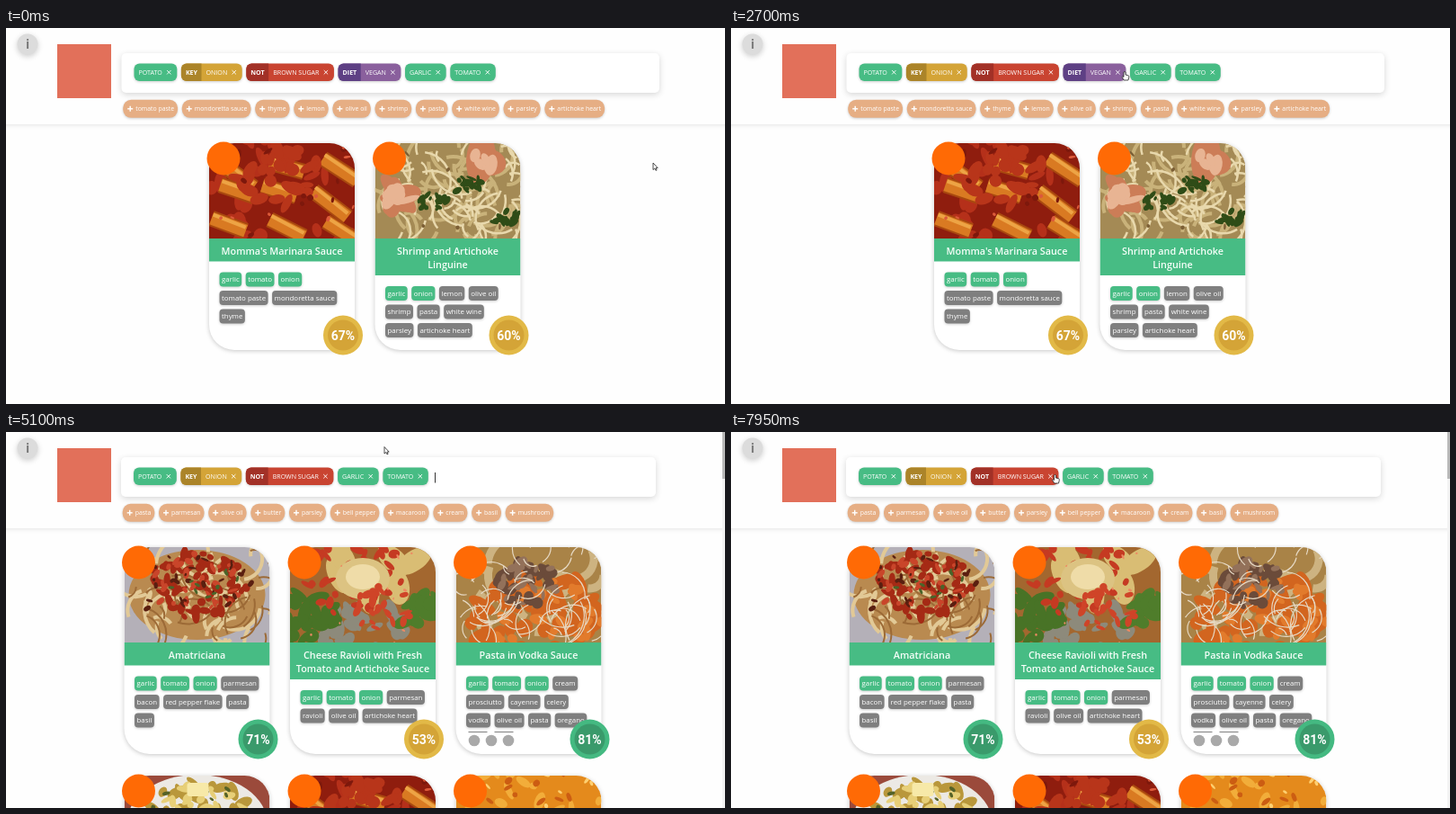
An HTML page with a canvas for the animation above (8000 ms loop, 800 by 418 pixels).

```html
<!DOCTYPE html>
<html lang="en">
<head>
<meta charset="utf-8">
<title>Recipe search</title>
<style>
html, body { margin: 0; width: 100%; height: 100%; overflow: hidden; background: #fefefe; }
canvas { display: block; }
</style>
</head>
<body>
<canvas id="stage" width="800" height="418"></canvas>
<script>
const LOOP = 8000, CLICK = 4000, LOADED = 4700, BLINK = 530;
const GREEN = '#47bc84', GRAY = '#7f7f7f', GOLD = '#d4a437', PAGE = '#fefefe';
const SANS = '"Open Sans", "Noto Sans", sans-serif', ROBOTO = 'Roboto, sans-serif';
const CARD_W = 162, CARD_H = 230, PHOTO_H = 106, COLUMN = 184.5, ROW = 254;
const stage = document.getElementById('stage').getContext('2d');
let g = stage;

// ---------- drawing helpers ----------
function shadow(blur = 0, dy = 0, alpha = 0) {
  g.shadowColor = `rgba(0,0,0,${alpha})`;
  g.shadowBlur = blur;
  g.shadowOffsetY = dy;
}
function box(x, y, w, h, r, color) {
  g.fillStyle = color;
  g.beginPath();
  g.roundRect(x, y, w, h, r);
  g.fill();
}
function raisedBox(...args) {
  shadow(3, 1, 0.2);
  box(...args);
  shadow();
}
function ellipse(color, x, y, rx, ry = rx, turn = 0) {
  g.fillStyle = color;
  g.beginPath();
  g.ellipse(x, y, rx, ry, turn, 0, 7);
  g.fill();
}
function text(str, x, y, font, color = '#fff', align = 'left') {
  g.font = font;
  g.fillStyle = color;
  g.textAlign = align;
  g.fillText(str, x, y);
}
function textWidth(str, font) {
  g.font = font;
  return g.measureText(str).width;
}
function line(color, width, x0, y0, x1, y1) {
  g.strokeStyle = color;
  g.lineWidth = width;
  g.beginPath();
  g.moveTo(x0, y0);
  g.lineTo(x1, y1);
  g.stroke();
}
function clipped(x, y, w, h, r, draw) {
  g.save();
  g.beginPath();
  g.roundRect(x, y, w, h, r);
  g.clip();
  g.translate(x, y);
  draw();
  g.restore();
}

// ---------- food pictures; places are fractions of the photo ----------
let seed = 1;
const random = () => (seed = (seed * 16807) % 2147483647) / 2147483647;

function fill(color) {
  box(0, 0, CARD_W, PHOTO_H, 0, color);
}
function bits(color, count, size, cx = 0.5, cy = 0.5, spread = 0.75) {
  while (count--) {
    const angle = random() * 6.3, away = Math.sqrt(random()) * spread;
    ellipse(color, (cx + Math.cos(angle) * away) * CARD_W, (cy + Math.sin(angle) * away) * PHOTO_H,
      size * (0.6 + random()), size * (0.4 + random() * 0.5), random() * 3);
  }
}
function strands(color, width, count) {
  g.strokeStyle = color;
  g.lineWidth = width;
  while (count--) {
    const start = random() * 6.3;
    g.beginPath();
    g.arc(random() * CARD_W, random() * PHOTO_H, 10 + random() * 25, start, start + 1 + random());
    g.stroke();
  }
}
function penne(count) {
  for (let i = 0; i < count; i++) {
    const x = (i % 3) * 58 + random() * 14, y = Math.floor(i / 3) * 36 + 10 + random() * 12;
    const dy = 10 + random() * 20;
    line('#a8480f', 18, x, y, x + 38, y + dy);
    line('#d97a22', 14, x, y, x + 38, y + dy);
    line('#eda445', 4, x + 2, y - 4, x + 38, y + dy - 4);
  }
}
const pictures = {
  marinara() {
    fill('#8f1d0e');
    bits('#b5301a', 40, 9);
    penne(9);
    bits('#b8351a', 30, 8, 0.5, 0.35, 0.3);
    bits('#7d180c', 22, 4);
    bits('#dc5a3a', 14, 2.5);
  },
  shrimp() {
    fill('#a48a55');
    strands('#c9b27a', 4, 60);
    strands('#e8d8ac', 2.5, 60);
    bits('#7c5f35', 20, 3);
    for (const [x, y] of [[0.16, 0.58], [0.74, 0.18]]) {
      bits('#cc7d57', 6, 19, x, y, 0.06);
      bits('#e8b493', 6, 9, x, y, 0.09);
    }
    for (const [x, y] of [[0.4, 0.62], [0.65, 0.45], [0.9, 0.8]]) bits('#2f4c17', 16, 4, x, y, 0.1);
  },
  amatriciana() {
    fill('#b4b0b8');
    ellipse('#b98a50', CARD_W / 2, PHOTO_H / 2, 76, 50);
    strands('#e2c996', 4, 50);
    strands('#9c6a36', 2, 35);
    bits('#a52a15', 60, 6, 0.5, 0.4, 0.34);
    bits('#c9452a', 30, 4, 0.5, 0.4, 0.34);
    bits('#5a1f10', 28, 3, 0.5, 0.45, 0.4);
    bits('#49652a', 10, 2.5, 0.5, 0.4, 0.3);
  },
  ravioli() {
    fill('#a3672f');
    bits('#8d8a7b', 34, 9, 0.5, 0.9, 0.3);
    bits('#487326', 30, 9, 0.08, 0.75, 0.25);
    bits('#4f7d2b', 24, 9, 0.95, 0.7, 0.2);
    bits('#d9bd74', 12, 16, 0.55, 0.1, 0.4);
    bits('#c53a22', 40, 6, 0.4, 0.3, 0.4);
    ellipse('#dcc382', CARD_W / 2, 35, 30, 23);
    ellipse('#efdca8', CARD_W / 2, 33, 19, 14);
    bits('#cf4428', 22, 5, 0.62, 0.65, 0.24);
    bits('#ee8a63', 16, 2);
  },
  vodka() {
    fill('#a98347');
    strands('#cdb381', 9, 20);
    bits('#d2651f', 60, 11, 0.55, 0.75, 0.45);
    bits('#e27b2c', 26, 7, 0.55, 0.75, 0.45);
    bits('#6b4b3a', 30, 7, 0.48, 0.4, 0.22);
    bits('#93715a', 22, 5, 0.48, 0.38, 0.25);
    strands('#e6d9c4', 1.2, 70);
  },
  gnocchi() {
    fill('#9b4a3b');
    ellipse('#ece9e4', CARD_W / 2, PHOTO_H / 2, 78, 54);
    bits('#b9973b', 60, 7, 0.5, 0.45, 0.38);
    bits('#e7cf78', 40, 5, 0.5, 0.45, 0.36);
    bits('#556227', 12, 3, 0.5, 0.4, 0.35);
    box(70, 8, 24, 15, 3, '#f7e9a8');
  },
  baked() {
    fill('#e48a1c');
    bits('#f2ad3a', 60, 7);
    bits('#cc5d12', 36, 4);
    bits('#ffd071', 30, 3);
  }
};

// ---------- interface parts ----------
function searchChips(x, chips) {
  const top = 39.5, h = 19.5, font = `500 7.1px ${SANS}`, bold = `700 7.1px ${SANS}`;
  for (const [label, color, key, keyColor] of chips) {
    const keyW = key ? textWidth(key, bold) + 9.5 : 0;
    const w = keyW + textWidth(label, font) + 21.5;
    raisedBox(x, top, w, h, 6, color);
    if (key) {
      box(x, top, keyW, h, [6, 0, 0, 6], keyColor);
      text(key, x + 5, 52, bold);
    }
    text(label, x + keyW + 5, 52, font);
    const cx = x + w - 9, cy = top + h / 2;
    for (const d of [-2.2, 2.2]) line('#fff', 0.9, cx - 2.2, cy - d, cx + 2.2, cy + d);
    x += w + 4.6;
  }
}
function suggestions(x, y, labels) {
  const font = `500 6.9px ${SANS}`;
  for (const label of labels.split(',')) {
    const w = textWidth(label, font) + 18;
    raisedBox(x, y, w, 20, 9, '#e6ae84');
    line('#fff', 1.4, x + 5, y + 10, x + 11, y + 10);
    line('#fff', 1.4, x + 8, y + 7, x + 8, y + 13);
    text(label, x + 14, y + 12.4, font);
    x += w + 4.7;
  }
}
function ingredients(y, rows, owned) {
  const font = `500 7.9px ${SANS}`;
  rows.forEach((row, r) => {
    let x = 11.5;
    const top = y + r * 20.5;
    row.split(',').forEach((label, i) => {
      const w = textWidth(label, font) + 5;
      raisedBox(x, top, w, 16, 4, r === 0 && i < owned ? GREEN : GRAY);
      text(label, x + 2.5, top + 10.8, font);
      x += w + 4.5;
    });
  });
}
function badge(x, y, percent) {
  const good = percent > 70;
  ellipse(good ? '#44b981' : '#e2b947', x, y, 22);
  ellipse(good ? '#3a9a6b' : GOLD, x, y, 17);
  text(percent + '%', x, y + 5, `700 14px ${ROBOTO}`, '#fff', 'center');
}
function card(x, y, { picture, title = [], rows = [], owned, percent, more }) {
  const extra = title.length > 1 ? 15.5 : 0;
  shadow(5, 1, 0.22);
  box(x, y, CARD_W, CARD_H, 28, '#fff');
  shadow();
  clipped(x, y, CARD_W, CARD_H, 28, () => {
    seed = 7;
    clipped(0, 0, CARD_W, PHOTO_H, 0, pictures[picture]);
    box(0, PHOTO_H, CARD_W, 25.5 + extra, 0, GREEN);
    title.forEach((part, i) =>
      text(part, CARD_W / 2, 123.5 + i * 15.5, `600 10.8px ${SANS}`, '#f6fff9', 'center'));
    ingredients(143.5 + extra, rows, owned);
    for (let i = 0; more && i < 3; i++) {
      if (i < 2) box(14 + i * 29, 205, 21, 1, 0, GRAY);
      ellipse('#a9a9a9', 20.5 + i * 19, 215, 6.3);
    }
  });
  ellipse('#ff6a05', x + 16, y + 17, 18.5);
  if (percent) badge(x + 149, y + 213.5, percent);
}
function cards(left, list) {
  list.forEach((item, i) => card(left + (i % 3) * COLUMN, 128 + Math.floor(i / 3) * ROW, item));
}
function header(left, right, vegan, suggested) {
  box(0, 0, 800, 418, 0, PAGE);
  shadow(5, 1, 0.1);
  box(-9, -9, 818, 116, 0, PAGE);
  shadow(6, 2, 0.2);
  ellipse('#dcdcdc', 24, 18, 11.5);
  shadow();
  text('i', 24, 23, `700 14px ${ROBOTO}`, '#777', 'center');
  box(57, 18, 60, 60, 0, '#e2705a');
  shadow(7, 2, 0.16);
  box(left, 28, right - left, 44, 5, '#fff');
  shadow();
  searchChips(left + 14, [
    ['POTATO', GREEN],
    ['ONION', GOLD, 'KEY', '#ab8429'],
    ['BROWN SUGAR', '#c94431', 'NOT', '#a23127'],
    ...(vegan ? [['VEGAN', '#8a609d', 'DIET', '#5e4084']] : []),
    ['GARLIC', GREEN],
    ['TOMATO', GREEN]
  ]);
  suggestions(left + 1.7, 79.8, suggested);
}

// ---------- the three screens ----------
const firstSuggestions = 'tomato paste,mondoretta sauce,thyme,lemon,olive oil,shrimp,pasta,white wine,parsley,artichoke heart';
const newSuggestions = 'pasta,parmesan,olive oil,butter,parsley,bell pepper,macaroon,cream,basil,mushroom';

function firstResults() {
  header(128.5, 727, true, firstSuggestions);
  cards(226, [
    { picture: 'marinara', title: ["Momma's Marinara Sauce"], owned: 3, percent: 67,
      rows: ['garlic,tomato,onion', 'tomato paste,mondoretta sauce', 'thyme'] },
    { picture: 'shrimp', title: ['Shrimp and Artichoke', 'Linguine'], owned: 2, percent: 60,
      rows: ['garlic,onion,lemon,olive oil', 'shrimp,pasta,white wine', 'parsley,artichoke heart'] }
  ]);
}
function loading() {
  header(128.5, 727, false, firstSuggestions);
  text('Loading Deliciousness...', 399.5, 359.5, `700 14px ${ROBOTO}`, '#000', 'center');
}
function newResults() {
  header(128, 723, false, newSuggestions);
  cards(131.5, [
    { picture: 'amatriciana', title: ['Amatriciana'], owned: 3, percent: 71,
      rows: ['garlic,tomato,onion,parmesan', 'bacon,red pepper flake,pasta', 'basil'] },
    { picture: 'ravioli', title: ['Cheese Ravioli with Fresh', 'Tomato and Artichoke Sauce'], owned: 3, percent: 53,
      rows: ['garlic,tomato,onion,parmesan', 'ravioli,olive oil,artichoke heart'] },
    { picture: 'vodka', title: ['Pasta in Vodka Sauce'], owned: 3, percent: 81, more: true,
      rows: ['garlic,tomato,onion,cream', 'prosciutto,cayenne,celery', 'vodka,olive oil,pasta,oregano'] },
    { picture: 'gnocchi' }, { picture: 'marinara' }, { picture: 'baked' }
  ]);
  box(797, 0, 3, 418, 0, '#f3f3f3');
  box(797, 0, 3, 52, 0, '#b9b9b9');
}
function prerender(draw) {
  const canvas = document.createElement('canvas');
  canvas.width = 800;
  canvas.height = 418;
  g = canvas.getContext('2d');
  draw();
  g = stage;
  return canvas;
}
const screens = [firstResults, loading, newResults].map(prerender);

// ---------- moving parts ----------
function fork(t) {
  const length = 221, bulge = (u, at) => Math.exp(-(((u - at) / 0.1) ** 2));
  const half = u => (2 + 2.7 * (bulge(u, 0.14) + bulge(u, 0.92))) * Math.min(1, Math.sqrt((1 - u) * 14));
  g.save();
  g.translate(346, 291);
  g.rotate(-0.871);
  g.beginPath();
  for (let u = 0; u <= 1; u += 0.02) g.lineTo(u * length, -half(u));
  for (let u = 1; u >= 0; u -= 0.02) g.lineTo(u * length, half(u));
  g.closePath();
  g.fillStyle = '#b5b5b5';
  g.fill();
  g.strokeStyle = '#666';
  g.lineWidth = 1;
  g.stroke();
  // pasta wound around the tines
  ellipse('#d9762f', -22, 0, 24, 9.5);
  for (let i = 0; i < 13; i++) {
    const x = 1 - i * 3.7, r = 4 + 8 * Math.sin(Math.PI * (i + 2) / 16);
    const lean = 2.5 * Math.sin(i * 2.3 + t / 160);
    line(['#e08a3c', '#b9541c', '#eea257'][i % 3], 2.2, x - lean, -r, x + lean, r);
  }
  g.restore();
}

// The pointer glides between rests: page, top edge, VEGAN's cross, top edge, SUGAR's cross.
const veganCross = [438, 49], sugarCross = [360.5, 48];
const moves = [
  { from: 900, to: 1800, start: [720, 150], end: [533.5, 8.5] },
  { from: 2000, to: 2600, start: [533.5, 8.5], end: veganCross },
  { from: 4050, to: 4300, start: veganCross, end: [421, 16.5], bend: -6 },
  { from: 7550, to: 7900, start: [421, 16.5], end: sugarCross }
];
function pointerAt(t) {
  const { from, to, start, end, bend = 0 } = moves.findLast(m => t >= m.from) || moves[0];
  const p = Math.min(1, Math.max(0, (t - from) / (to - from))), k = p * p * (3 - 2 * p);
  return [
    start[0] + (end[0] - start[0]) * k + bend * Math.sin(Math.PI * p),
    start[1] + (end[1] - start[1]) * k
  ];
}
const arrow = new Path2D('M0 0V7.6L1.8 6 3 8.4 4.1 7.9 3 5.6H5.2Z');
const hand = new Path2D('M-1 0Q0-1 1 0V3L4 3.8Q5 4 4.8 5.5L4 9H-.8L-3 5.4Q-2.6 4.3-1 5.4Z');

function pointer(t) {
  const [x, y] = pointerAt(t), cross = t < CLICK ? veganCross : sugarCross;
  const overCross = Math.hypot(x - cross[0], y - cross[1]) < 5;
  const overField = y > 28 && y < 72 && x < 727;
  g.save();
  g.translate(x, y);
  if (overField && !overCross) {
    line('#333', 0.9, 0, -3.5, 0, 3.5);
    for (const end of [-3.7, 3.7]) line('#333', 0.8, -1.5, end, 1.5, end);
  } else {
    const shape = overCross ? hand : arrow;
    g.fillStyle = '#fff';
    g.fill(shape);
    g.strokeStyle = '#222';
    g.lineWidth = 0.8;
    g.stroke(shape);
  }
  g.restore();
}

function frame() {
  const t = performance.now() % LOOP;
  const screen = t < CLICK ? 0 : t < LOADED ? 1 : 2;
  g.drawImage(screens[screen], 0, 0);
  if (screen === 1) fork(t);
  if (screen > 0 && (t - CLICK) % (2 * BLINK) < BLINK) box(477, 45, 1, 11.5, 0, '#333');
  pointer(t);
  requestAnimationFrame(frame);
}
frame();
</script>
</body>
</html>
```
